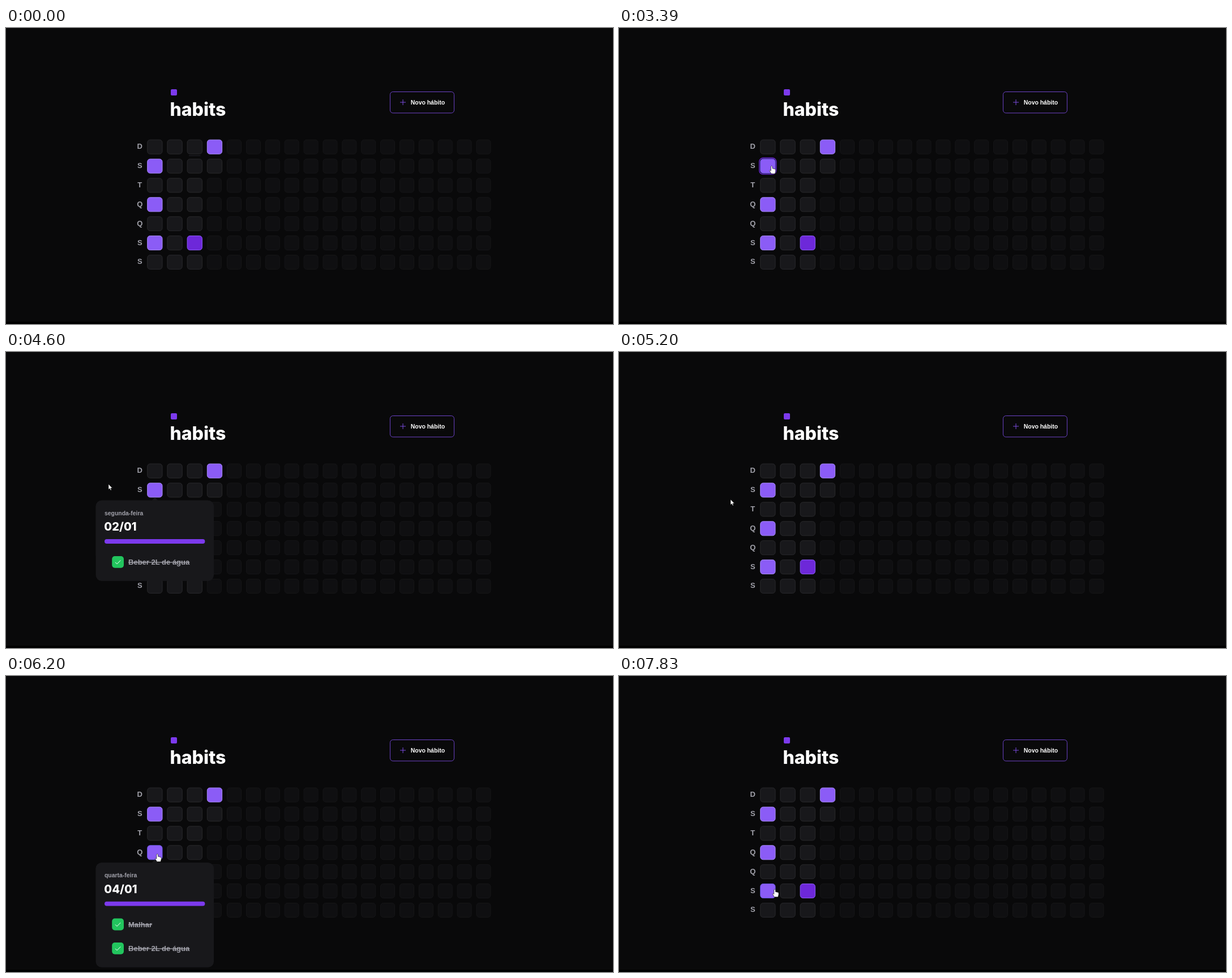
An HTML page that plays this animation: 1072x522 px, repeating every 8 s.

```html
<!DOCTYPE html>
<html lang="pt">
<head>
<meta charset="utf-8">
<title>habits</title>
<style>
  html, body { margin: 0; width: 100%; height: 100%; overflow: hidden; background: #09090a; }
  svg { display: block; }
  text { font: bold 13.03px "Liberation Sans", Arial, sans-serif; fill: #a1a1aa; }
  .small { font-size: 10.43px; }
  .title { font: 800 32px Inter, sans-serif; fill: #fff; }
  .date { font: 800 20px Inter, sans-serif; fill: #fff; }
  .done { text-decoration: line-through; }
</style>
</head>
<body>
<svg id="stage" width="1072" height="522" viewBox="0 0 1072 522"></svg>
<script>
const LOOP = 8000;
const stage = document.getElementById('stage');
const box = (x, y, w, h, r, fill, extra = '') =>
  `<rect x="${x}" y="${y}" width="${w}" height="${h}" rx="${r}" fill="${fill}" ${extra}/>`;
const text = (x, y, s, attrs = '') => `<text x="${x}" y="${y}" ${attrs}>${s}</text>`;
const rowY = r => 196.7 + 33.87 * r;

// Habit days as "row,column", with fill and border
const bright = ['#8b5cf6', '#a78bfa'];
const filled = { '0,3': bright, '1,0': bright, '3,0': bright, '5,0': bright, '5,2': ['#6d28d9', '#8b5cf6'] };

function cell(r, c) {
  const past = c < 3 || (c === 3 && r < 2);
  const x = c < 4 ? 249.2 + 35.2 * c : 390 + 33.88 * (c - 4);
  const [fill, line] = filled[[r, c]] || (past ? ['#18181b', '#29292c'] : ['#0f0f11', '#161618']);
  return box(x + .5, rowY(r) + .5, past ? 26.3 : 25, 25, 4.8, fill, `id="c${r}_${c}" stroke="${line}"`);
}

function popup(id, top, day, date, items) {
  const list = items.map((name, i) => {
    const y = top + 108.7 + 42.4 * i;
    return box(187.2, y - 10.4, 20.8, 20.8, 5, '#22c55e') +
      `<path d="M193 ${y + .4}l3 3 6.3-6.4" fill="none" stroke="#fff"/>` +
      text(216, y + 4.5, name, 'class="done"');
  }).join('');
  return `<g id="${id}"><path d="M257.8 ${top}l5.2-5.2 5.2 5.2z" fill="#18181b"/>` +
    box(158.6, top, 208.4, 107, 10.4, '#18181b') +
    `<g class="items">${box(158.6, top, 208.4, 99.7 + 42.4 * items.length, 10.4, '#18181b')}${list}</g>` +
    text(174, top + 26, day, 'class="small"') +
    text(173.3, top + 53.4, date, 'class="date"') +
    box(174, top + 68.4, 177.4, 7.8, 3.9, '#7c3aed') + '</g>';
}

let grid = '';
for (let r = 0; r < 7; r++) {
  grid += text(236.3, rowY(r) + 16.5, 'DSTQQSS'[r], 'text-anchor="middle"');
  for (let c = 0; c < 18; c++) grid += cell(r, c);
}

stage.innerHTML =
  box(0, 0, 1072, 522, 0, '#09090a') + box(0, 518, 1072, 4, 0, '#000') +
  box(291, 108, 11, 11, 2, '#7c3aed') +
  text(289.4, 154.5, 'habits', 'class="title"') +
  box(678.4, 112.5, 113, 37.4, 5, 'none', 'stroke="#6d42c8"') +
  '<path d="M696 131h10M701 126v10" stroke="#7c4ce0"/>' +
  text(714.8, 134.6, 'Novo hábito', 'class="small" style="fill:#fff"') +
  grid +
  box(323, 224.6, 20.5, 1, 0, '#25252c', 'id="line"') +
  box(247.7, 0, 30, 28.6, 6.5, 'none', 'id="ring" stroke="#6d28d9" stroke-width="1.3"') +
  popup('monday', 261.7, 'segunda-feira', '02/01', ['Beber 2L de água']) +
  popup('wednesday', 329.3, 'quarta-feira', '04/01', ['Malhar', 'Beber 2L de água']) +
  '<circle id="click" cx="185.5" cy="305.6" r="9" fill="#827c08"/>' +
  '<path id="arrow" d="M0 0V9.5L2.2 7.6 3.7 11 5.2 10.3 3.8 7.1H6.8Z" stroke="#000" stroke-width=".5"/>' +
  '<path id="hand" d="M-1.3 1.2Q0-.8 1.3 1.2V4.6L6 5.8Q7 6.2 7 7.5V10L5.8 14H-.6L-4 8.4Q-3.6 6.8-1.3 8.8Z" fill="#fff" stroke="#000" stroke-width=".6"/>';

// Pointer poses: start time, then shape and position (none = hidden)
const poses = [
  [0], [790, 'arrow', 607, 407], [990, 'arrow', 597, 407.5], [1390, 'arrow', 330, 455],
  [1590], [1790, 'arrow', 84, 483], [1990, 'arrow', 54, 481],
  [2390, 'arrow', 75, 446], [2590, 'arrow', 145, 350], [2790, 'arrow', 232, 262],
  [2990, 'hand', 269.6, 243], [4200, 'arrow', 236, 243], [4400, 'arrow', 189, 235],
  [4600, 'arrow', 181, 233], [5000, 'arrow', 182, 236], [5200, 'arrow', 197, 260],
  [5400, 'arrow', 228, 291], [5600, 'hand', 263, 309], [5800, 'hand', 267.2, 313.6],
  [6800, 'arrow', 222, 309], [7020, 'arrow', 185.5, 305], [7420, 'arrow', 188, 309],
  [7620, 'arrow', 233, 349], [7830, 'hand', 275, 375.8]
];
const hovers = { c1_0: [2990, 4200], c3_0: [5600, 6800], c5_0: [7830, LOOP] };
const $ = s => stage.querySelector(s);
const show = (s, on) => { $(s).style.display = on ? '' : 'none'; };

function draw() {
  const t = performance.now() % LOOP;
  const during = (a, b) => t >= a && t < b;
  const [, shape, x, y] = poses.findLast(p => p[0] <= t);
  for (const s of ['arrow', 'hand']) show('#' + s, s === shape);
  if (shape) $('#' + shape).setAttribute('transform', `translate(${x} ${y})`);

  const clicked = during(7220, 7420);
  show('#click', clicked);
  $('#arrow').setAttribute('fill', clicked ? '#ffffa0' : '#fff');
  for (const id in hovers) $('#' + id).setAttribute('stroke', during(...hovers[id]) ? '#6d5ce8' : bright[1]);

  show('#line', t < 3390);
  show('#ring', during(3390, 3600) || during(5800, 6000));
  $('#ring').setAttribute('y', rowY(t < 5000 ? 1 : 3) - 1.3);
  show('#monday', during(3600, 5000));
  show('#wednesday', during(6000, 7420));
  show('#wednesday .items', t >= 6200);
  requestAnimationFrame(draw);
}
draw();
</script>
</body>
</html>
```
